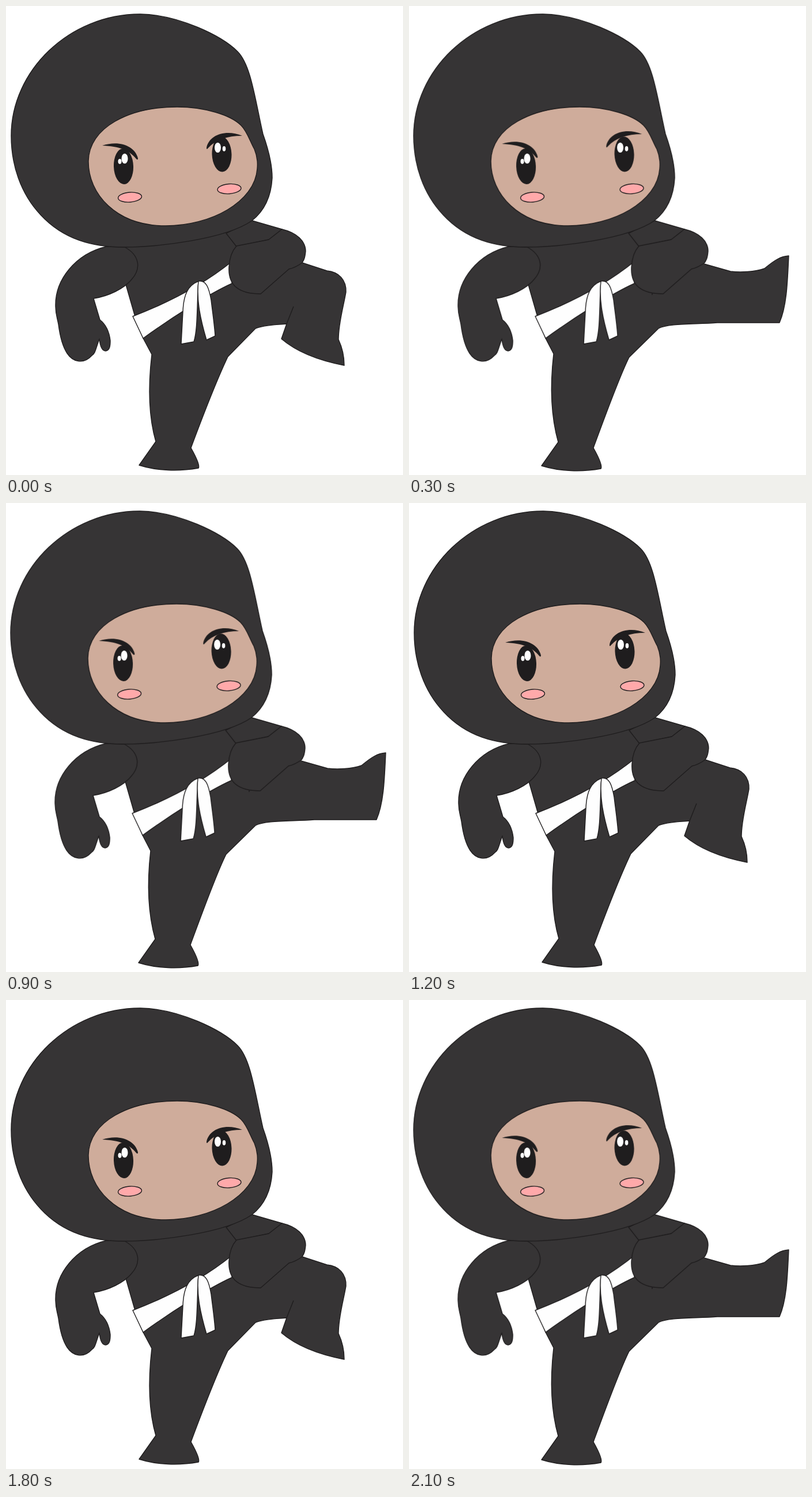
An HTML page for the animation above (2.4 s loop, 689 by 813 pixels).

```html
<!DOCTYPE html>
<html lang="en">
<head>
<meta charset="utf-8">
<title>Ninja kick</title>
<style>
  html, body { margin: 0; width: 100%; height: 100%; overflow: hidden; background: #fff; }
  svg { display: block; width: 689px; height: 813px; }
  .ink { stroke: #1f1d1e; stroke-width: 1.4; stroke-linejoin: round; }
  .suit { fill: #363435; }
  .skin { fill: #cfac9b; }
  .blush { fill: #ffa9aa; }
  .cloth { fill: #fefefe; }
  .dark { fill: #1f1d1e; }
  .line { fill: none; }

  /* Two hard-cut poses, 300 ms each */
  .rest, .kick, .upper, .brows { animation: 600ms step-end infinite; }
  .rest { animation-name: hide; }
  .kick { animation-name: show; }
  .upper { animation-name: sway; }
  .brows { animation-name: frown; }
  @keyframes hide { 0% { opacity: 1; } 50%, 100% { opacity: 0; } }
  @keyframes show { 0% { opacity: 0; } 50%, 100% { opacity: 1; } }
  @keyframes sway { 0% { transform: none; } 50%, 100% { transform: translate(-.9px, -.1px); } }
  @keyframes frown { 0% { transform: none; } 50%, 100% { transform: translate(-4.8px, -2.8px); } }
</style>
</head>
<body>
<svg viewBox="0 0 689 813">
  <!-- Torso and legs -->
  <g class="rest ink suit">
    <path d="M185 405L208 483L223 535L238 576L253 604C247 655 247 710 260 755L231 796
      C262 806 300 807 334 801C337 797 330 782 321 766C340 715 365 650 385 608L433 559
      C448 553 467 553 487 551L478 577C505 600 545 615 587 623C587 607 584 593 577 578
      C577 550 586 520 590 496C591 475 578 461 557 459L514 445L480 430L400 400L380 375Z"/>
    <path class="line" d="M499 521L487 551"/>
  </g>
  <g class="kick ink suit">
    <path d="M184 405L207 483L222 535L237 576L251 603C245 655 246 710 259 756L230 797
      C262 807 300 808 333 802C336 798 329 782 320 766C339 715 364 645 382 609L386 605L433 559
      C450 550 495 552 535 549L643 549C656 520 657 475 659 433C645 434 635 440 617 455
      C600 461 575 462 558 460L512 447L480 430L400 400L380 375Z"/>
    <path class="line" d="M422 497V501"/>
  </g>

  <g class="upper">
    <!-- Belt -->
    <g class="ink cloth">
      <path d="M220 538C280 515 340 485 392 443V481C350 500 285 542 238 576Z"/>
      <path d="M334 477C316 484 308 500 307 530L304 586L326 582C333 560 331 520 334 477Z"/>
      <path d="M334 477C347 475 352 487 356 510C359 535 362 555 363 572L348 579C338 545 330 510 334 477Z"/>
    </g>

    <!-- Arms -->
    <g class="ink suit">
      <path d="M174 417C120 430 85 475 86 520C86 535 89 540 91 552C94 575 98 590 106 602
        C116 617 134 622 149 606C155 602 155 597 162 577C163 587 166 598 173 598
        C180 597 181 590 181 580C179 563 172 551 163 544L152 507C178 503 205 490 218 474
        C235 455 232 432 206 418Z"/>
      <path d="M382 394L427 372L479 387L456 405L400 417Z"/>
      <path d="M479 387C505 393 520 408 520 425C519 435 518 439 514 445C506 451 500 454 491 456
        L442 499C405 499 385 485 387 452C388 435 392 425 400 416L456 405Z"/>
    </g>

    <!-- Head -->
    <path class="ink suit" d="M233 14C300 15 375 52 402 79C425 102 432 160 446 222
      C456 250 462 275 462 298C460 335 446 357 427 372C380 405 260 418 205 418
      C150 418 100 405 60 362C25 325 9 275 9 225C9 112 110 14 233 14Z"/>
    <path class="ink skin" d="M143 270C143 210 215 175 297 175C345 175 390 189 408 207
      C419 218 424 236 431 248C436 260 437 272 436 282C432 340 355 381 277 381
      C190 381 143 325 143 270Z"/>

    <g class="dark">
      <ellipse cx="204" cy="278" rx="17" ry="31" transform="rotate(-2 204 278)"/>
      <ellipse cx="374.5" cy="257" rx="17" ry="30.5" transform="rotate(-2 374.5 257)"/>
    </g>
    <g class="cloth">
      <ellipse cx="206" cy="264.5" rx="5.5" ry="8.7"/>
      <ellipse cx="197.5" cy="269.5" rx="3" ry="4.4"/>
      <ellipse cx="367.5" cy="245.5" rx="5.5" ry="8.7"/>
      <ellipse cx="378.5" cy="247.5" rx="2.8" ry="4.4"/>
    </g>
    <g class="ink blush">
      <ellipse cx="215" cy="331.5" rx="20.5" ry="8.5" transform="rotate(-4 215 331.5)"/>
      <ellipse cx="387.5" cy="317" rx="20.5" ry="8.5" transform="rotate(-4 387.5 317)"/>
    </g>
    <g class="brows dark">
      <path d="M167 242C197 232 224 243 229 264Q229 268 226 265C214 250 197 243 167 242Z"/>
      <path d="M410 225C382 213 352 223 348 246Q348 250 351 246C364 232 384 225 410 225Z"/>
    </g>
  </g>
</svg>
</body>
</html>
```
